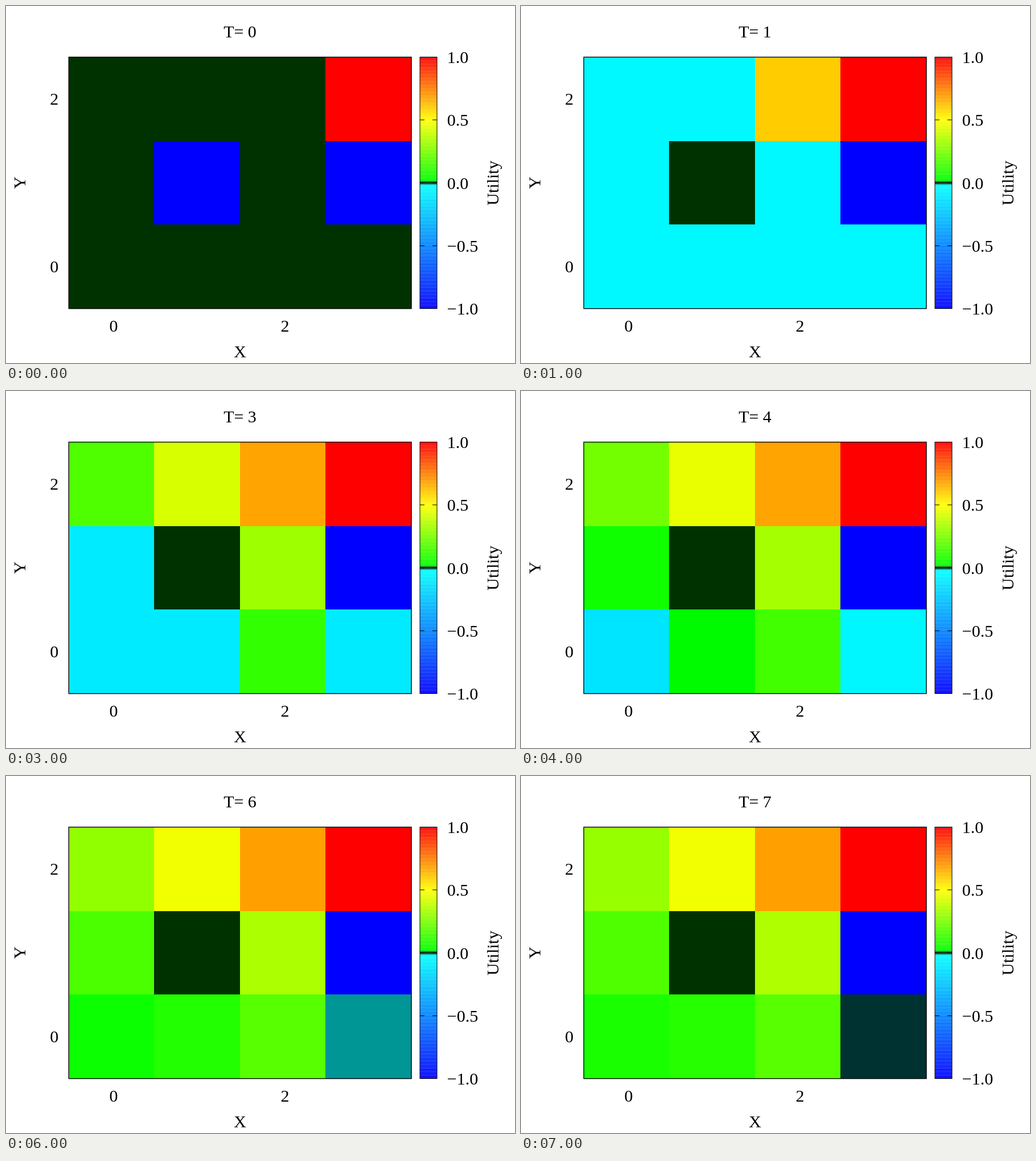
Recreate the animation shown at these times as an HTML page with a canvas. Size 894 px wide and 626 px high, loop 8 s.

```html
<!DOCTYPE html>
<html lang="en">
<head>
<meta charset="utf-8">
<title>Value iteration</title>
<style>
  html, body { margin: 0; width: 100%; height: 100%; overflow: hidden; background: #fff; }
  canvas { display: block; }
</style>
</head>
<body>
<canvas id="stage" width="894" height="626"></canvas>
<script>
const ctx = document.getElementById('stage').getContext('2d');
const COLS = 4, ROWS = 3, STEPS = 8, LEVELS = 256;
const DISCOUNT = 0.8, REWARD = -0.04;
const DIRS = [[0, 1], [1, 0], [0, -1], [-1, 0]];
const STOPS = [
  [-1, 0, 0, 255], [-0.02, 0, 255, 255], [0, 0, 0, 0],
  [0.02, 0, 255, 0], [0.5, 255, 255, 0], [1, 255, 0, 0]
];

// Grid world: row 0 is at the bottom, the wall is (1,1), the exits are (3,1) and (3,2).
const isWall = (x, y) => x === 1 && y === 1;
const isExit = (x, y) => x === 3 && y > 0;

function iterate(grid) {
  const look = (x, y, [dx, dy]) => {
    const nx = x + dx, ny = y + dy;
    const blocked = nx < 0 || ny < 0 || nx >= COLS || ny >= ROWS || isWall(nx, ny);
    return blocked ? grid[y][x] : grid[ny][nx];
  };
  return grid.map((row, y) => row.map((value, x) => {
    if (isWall(x, y)) return 0;
    if (isExit(x, y)) return value;
    const outcomes = DIRS.map((dir, i) =>
      0.8 * look(x, y, dir) +
      0.1 * look(x, y, DIRS[(i + 1) % 4]) +
      0.1 * look(x, y, DIRS[(i + 3) % 4]));
    return REWARD + DISCOUNT * Math.max(...outcomes);
  }));
}

const grids = [[[0, 0, 0, 0], [0, -1, 0, -1], [0, 0, 0, 1]]];
while (grids.length < STEPS) grids.push(iterate(grids[grids.length - 1]));

function levelColor(level) {
  const v = level / (LEVELS - 1) * 2 - 1;
  const i = Math.max(1, STOPS.findIndex(stop => v <= stop[0]));
  const a = STOPS[i - 1], b = STOPS[i];
  const k = (v - a[0]) / (b[0] - a[0]);
  const rgb = [1, 2, 3].map(c => Math.round(a[c] + (b[c] - a[c]) * k));
  return `rgb(${rgb})`;
}

const valueColor = v =>
  levelColor(Math.min(LEVELS - 1, Math.floor((v + 1) / 2 * LEVELS)));

function text(str, x, y, align = 'center', angle = 0) {
  ctx.save();
  ctx.translate(x, y);
  ctx.rotate(angle);
  ctx.textAlign = align;
  ctx.fillText(str, 0, 0);
  ctx.restore();
}

function line(x1, y, x2) {
  ctx.beginPath();
  ctx.moveTo(x1, y);
  ctx.lineTo(x2, y);
  ctx.stroke();
}

function drawCells(grid) {
  const left = x => Math.floor(110 + 150.5 * x);
  const top = y => Math.round(90 + 440 * (ROWS - y) / ROWS);
  grid.forEach((row, y) => row.forEach((value, x) => {
    ctx.fillStyle = valueColor(value);
    ctx.fillRect(left(x), top(y + 1), left(x + 1) - left(x), top(y) - top(y + 1));
  }));
}

function drawColorBar() {
  const band = 441 / LEVELS;
  for (let i = 0; i < LEVELS; i++) {
    ctx.fillStyle = levelColor(i);
    ctx.fillRect(727, 530.5 - (i + 1) * band, 30, band);
  }
  ctx.lineWidth = 1;
  ctx.strokeRect(727, 89.5, 30, 441);
  ctx.fillStyle = '#000';
  for (let i = 0; i < 5; i++) {
    const v = 1 - i / 2, y = 89.5 + i * 110.25;
    line(727, y, 735);
    line(749, y, 757);
    text(v.toFixed(1).replace('-', '\u2212'), 774.8, y + 10.5, 'left');
  }
}

function draw(step) {
  ctx.fillStyle = '#fff';
  ctx.fillRect(0, 0, 894, 626);
  ctx.strokeStyle = '#000';
  ctx.font = '30px "Liberation Serif", "Times New Roman", serif';
  drawCells(grids[step]);
  ctx.lineWidth = 1.4;
  ctx.strokeRect(110.3, 89.6, 601.7, 441);
  drawColorBar();
  text('T= ' + step, 411, 55);
  for (const n of [0, 2]) {
    text(n, 189 + n * 150.5, 571);
    text(n, 92.3, 467 - n * 147, 'right');
  }
  text('X', 411, 616);
  text('Y', 34, 310, 'center', -Math.PI / 2);
  text('Utility', 865, 310.5, 'center', -Math.PI / 2);
}

let shown = -1;
function tick() {
  const step = Math.floor(performance.now() / 1000) % STEPS;
  if (step !== shown) draw(shown = step);
  requestAnimationFrame(tick);
}
tick();
</script>
</body>
</html>
```
